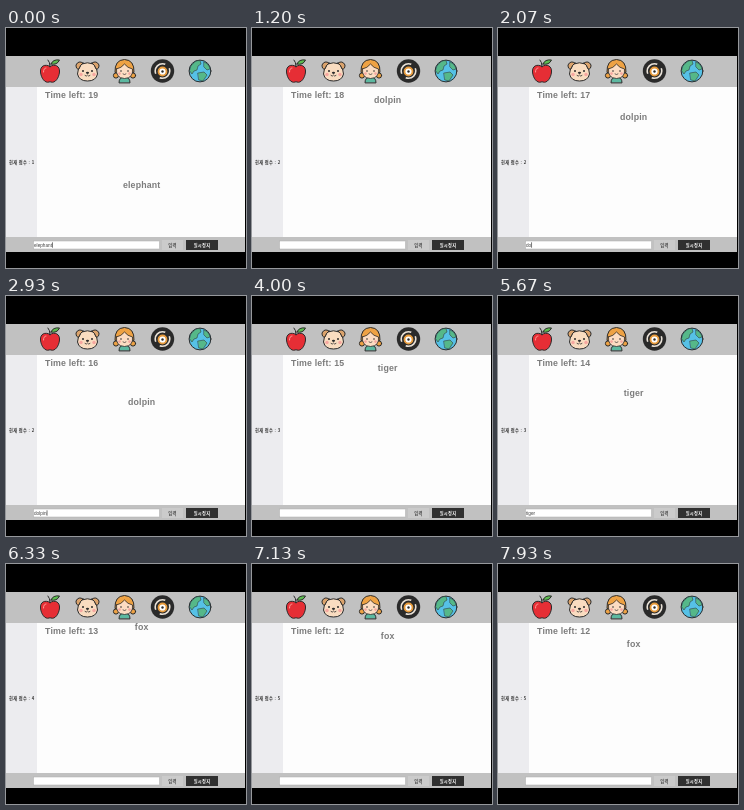
These frames come from a looping animation (240x240 px, 8000 ms). An HTML page:

```html
<!DOCTYPE html>
<html lang="ko">
<head>
<meta charset="utf-8">
<title>Word game</title>
<style>
  html, body { margin: 0; width: 100%; height: 100%; overflow: hidden; background: #000; }
  svg { display: block; width: 100%; height: 100%; }
  text { font-family: "Liberation Sans", Arial, sans-serif; white-space: pre; }
  .big { font-size: 8.8px; font-weight: bold; letter-spacing: .17px; fill: #7c7c7c; }
  .ko { font-family: "Noto Sans CJK KR", "Noto Sans CJK", sans-serif; font-size: 4.2px; font-weight: bold; letter-spacing: .3px; }
  .icon { stroke: #2b2b2b; stroke-width: 1; stroke-linejoin: round; stroke-linecap: round; }
</style>
</head>
<body>
<svg viewBox="0 0 240 240">
  <rect width="240" height="240"/>
  <rect y="28" width="239" height="196" fill="#c1c1c1"/>
  <rect y="59" width="31" height="150" fill="#ececef"/>
  <rect x="31" y="59" width="208" height="150" fill="#fdfdfd"/>

  <!-- apple -->
  <g class="icon" transform="translate(44 43)">
    <path d="M0-4.500C-5-7.500-10-5-9.500 1C-9 7-5 12.500-1 11Q0 10.500 1 11C5 12.500 9 7 9.500 1C10-5 5-7.500 0-4.500Z" fill="#e62e35"/>
    <path d="M0-4.500Q0-9-2-11" fill="none"/>
    <path d="M1-7Q3-12 9.500-11Q7-5.500 1-7Z" fill="#5dbb50"/>
    <path d="M-6.500 1Q-6.500-3-4-3" fill="none" stroke="#ff9a94"/>
  </g>

  <!-- dog -->
  <g class="icon" transform="translate(81.500 43)">
    <path d="M-6-7Q0-9.500 6-7Q10-3 10 3Q8.500 10 0 10Q-8.500 10-10 3Q-10-3-6-7Z" fill="#f9dcc0"/>
    <path d="M-4.500-8Q-9-11-11.500-6Q-11.500-1.500-8.500-2Q-7.500-6-4.500-8Z" fill="#dba36c"/>
    <path d="M4.500-8Q9-11 11.500-6Q11.500-1.500 8.500-2Q7.500-6 4.500-8Z" fill="#dba36c"/>
    <g stroke="none">
      <circle cx="-4.500" r="1" fill="#2b2b2b"/><circle cx="4.500" r="1" fill="#2b2b2b"/>
      <circle cx="-6.500" cy="3.500" r="1.700" fill="#f6a6a0"/><circle cx="6.500" cy="3.500" r="1.700" fill="#f6a6a0"/>
      <ellipse cy="1.800" rx="1.600" ry="1.100" fill="#2b2b2b"/>
    </g>
    <path d="M-2.500 4.500Q-1 6 0 4Q1 6 2.500 4.500" fill="none" stroke-width=".8"/>
  </g>

  <!-- girl -->
  <g class="icon" transform="translate(118.500 43)">
    <path d="M-5.500 11.500Q-5.500 6 0 6Q5.500 6 5.500 11.500Z" fill="#5cb8a0"/>
    <circle cx="-8.500" cy="4.500" r="2.600" fill="#eea244"/>
    <circle cx="8.500" cy="4.500" r="2.600" fill="#eea244"/>
    <path d="M-9.500 1Q-10-11 0-11.500Q10-11 9.500 1Z" fill="#eea244"/>
    <path d="M-8-2Q-3-3 0-7Q3-3 8-2Q9 7 0 7.500Q-9 7-8-2Z" fill="#fcdcc2" stroke-width=".8"/>
    <g stroke="none">
      <circle cx="-3.500" r=".8" fill="#2b2b2b"/><circle cx="3.500" r=".8" fill="#2b2b2b"/>
      <circle cx="-5" cy="2.600" r="1.300" fill="#f6a6a0"/><circle cx="5" cy="2.600" r="1.300" fill="#f6a6a0"/>
    </g>
    <path d="M-1.500 3Q0 4.300 1.500 3" fill="none" stroke-width=".7"/>
  </g>

  <!-- wheel -->
  <g transform="translate(156.500 43)" fill="none">
    <circle r="11.700" fill="#2a2a2a"/>
    <circle r="7.300" stroke="#e9e2d8" stroke-width="1.600" pathLength="8" stroke-dasharray="3 1" stroke-dashoffset=".5"/>
    <circle cy=".5" r="4" fill="#fff" stroke="#e79b3c" stroke-width="1.800"/>
    <circle cy=".5" r="1.200" fill="#2a2a2a"/>
  </g>

  <!-- globe -->
  <g class="icon" transform="translate(194 43)">
    <circle r="10.900" fill="#56c1e6"/>
    <g fill="#55b889" stroke-width=".5">
      <path d="M-9-5Q-5-11 0-10.500L1-7L-2-5L-3-1L-6 0L-8 3L-10.300 0Z"/>
      <path d="M4-9Q9-7 10-2L7-1L4-4Z"/>
      <path d="M-2 2L4 1L7 4L3 10L-1 9Z"/>
    </g>
  </g>

  <text id="timer" class="big" x="39" y="70"></text>
  <text id="word" class="big" x="135.700" text-anchor="middle"></text>
  <text id="score" class="ko" x="3" y="135.700" fill="#333"></text>

  <rect x="27.500" y="213" width="126" height="8" fill="#fff" stroke="#aaa" stroke-width=".5"/>
  <text id="typed" x="28" y="218.500" font-size="4.700" fill="#444"></text>
  <rect id="caret" y="214.300" width=".6" height="5.400" fill="#222"/>
  <rect x="156" y="212" width="21" height="10" fill="#cbcbcb"/>
  <text class="ko" x="166.500" y="218.500" text-anchor="middle" fill="#444">입력</text>
  <rect x="180" y="212" width="32" height="10" fill="#303030"/>
  <text class="ko" x="196" y="218.500" text-anchor="middle" fill="#fff">일시정지</text>
</svg>
<script>
const LOOP = 8000, TICK = 502, FIRST_TICK = 413;
const $ = id => document.getElementById(id);
const ticksAt = t => Math.floor((t - FIRST_TICK) / TICK) + 1;

// Each round lasts until the next word appears; typing runs from typeStart to typeEnd.
const rounds = [
  { word: "elephant", start: 0, steps: 11, typeStart: -900, typeEnd: -100 },
  { word: "dolpin", start: 560, steps: 0, typeStart: 1600, typeEnd: 2850 },
  { word: "tiger", start: 3470, steps: 0, typeStart: 4550, typeEnd: 5450 },
  { word: "fox", start: 6000, steps: 0, typeStart: 6420, typeEnd: 6720 },
  { word: "fox", start: 6880, steps: 0, typeStart: LOOP, typeEnd: LOOP + 300 }
];

function typedText({ word, typeStart, typeEnd }, t) {
  if (t < typeStart) return "";
  const progress = (t - typeStart) / (typeEnd - typeStart);
  return word.slice(0, 1 + Math.floor(progress * (word.length - 1)));
}

function draw(t) {
  const index = rounds.findLastIndex(r => t >= r.start);
  const round = rounds[index];
  const steps = round.steps + ticksAt(t) - ticksAt(round.start);

  $("timer").textContent = "Time left: " + (19 - Math.floor(ticksAt(t) / 2));
  $("word").textContent = round.word;
  $("word").setAttribute("y", 66 + 8.5 * steps);
  $("score").textContent = "현재 점수 : " + (index + 1);

  const typed = typedText(round, t);
  $("typed").textContent = typed;
  const width = typed ? $("typed").getComputedTextLength() : 0;
  $("caret").setAttribute("x", 28.2 + width);
  $("caret").style.opacity = typed && Math.floor((t + 200) / 500) % 2 === 0 ? 1 : 0;
}

const origin = performance.now();
function frame() {
  draw((performance.now() - origin) % LOOP);
  requestAnimationFrame(frame);
}
frame();
</script>
</body>
</html>
```
